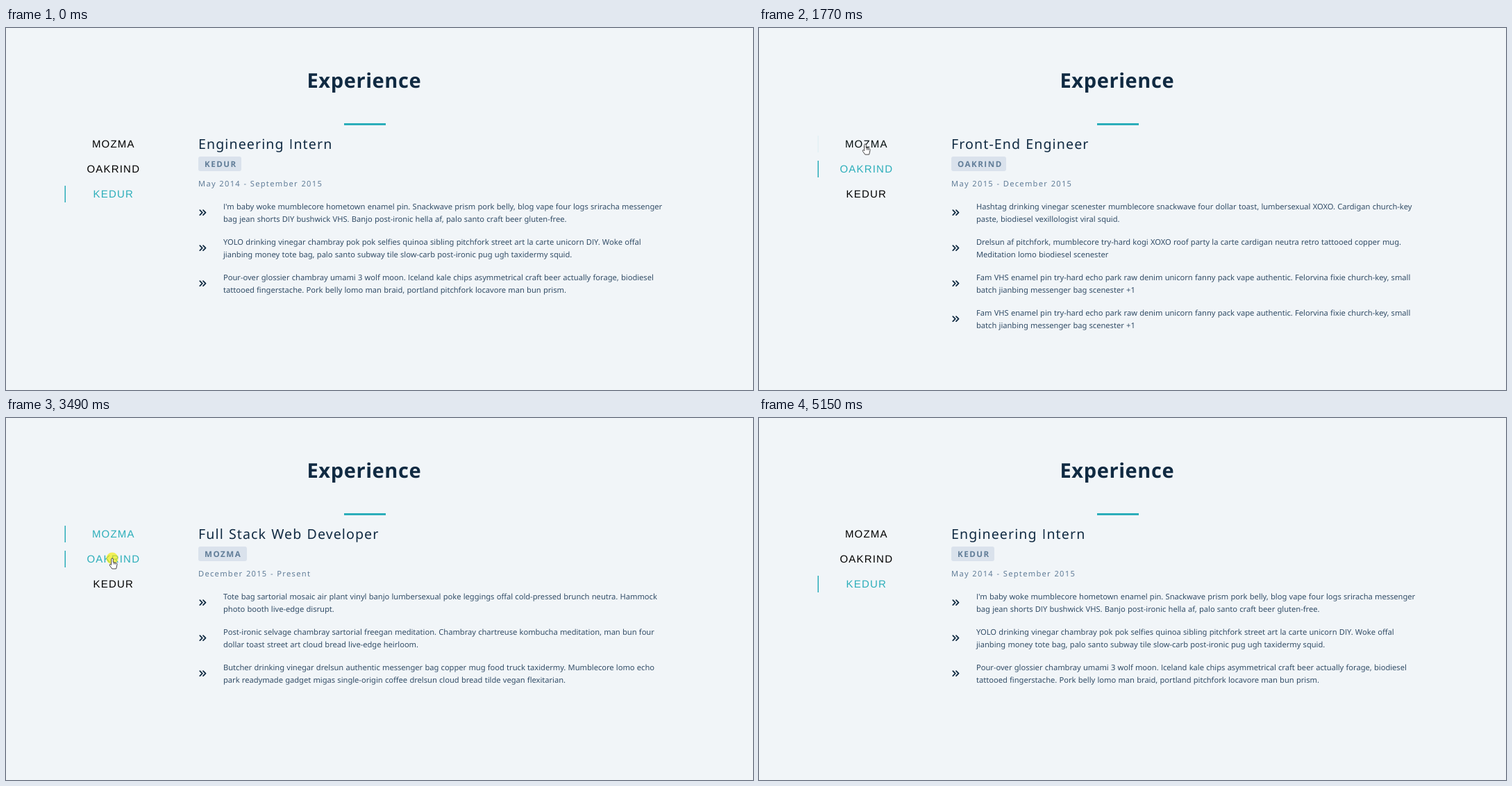
An HTML page that plays this animation: 1076x521 px, repeating every 6480 ms.

```html
<!DOCTYPE html>
<html lang="en">
<head>
<meta charset="utf-8">
<title>Experience</title>
<style>
  html, body { margin: 0; width: 100%; height: 100%; overflow: hidden; background: #f1f5f8; }
  svg { display: block; width: 100%; height: 100%; }
  text { font-family: "Noto Sans", "Open Sans", sans-serif; text-rendering: geometricPrecision; white-space: pre; }
  .plain { font-family: "Open Sans", "Noto Sans", sans-serif; }
  .head { font-size: 29px; font-weight: 700; letter-spacing: .6px; fill: #102a42; }
  .tab { font: 15px "Liberation Sans", Arial, sans-serif; letter-spacing: 1.2px; text-anchor: middle; }
  .role { font-size: 19.6px; letter-spacing: 1.1px; word-spacing: .9px; fill: #102a42; }
  .badge { font-size: 11.6px; font-weight: 700; letter-spacing: 1.5px; fill: #617d98; }
  .date { font-size: 11.16px; letter-spacing: 1.27px; word-spacing: .3px; fill: #617d98; }
  .line { font-size: 11.16px; letter-spacing: -.025px; word-spacing: .38px; fill: #324d67; }
  .icon { fill: none; stroke: #102a42; stroke-width: 1.8; stroke-linecap: round; stroke-linejoin: round; }
  .cursor { fill: #fff; stroke: #333; stroke-width: .9; stroke-linejoin: round; }
</style>
</head>
<body>
<svg id="stage" viewBox="0 0 1076 521"></svg>
<script>
const LOOP = 6480;
const FADE = 300;
const TEAL = [44, 174, 186];
const TAB_STEP = 36;

const fam = [
  "Fam VHS enamel pin try-hard echo park raw denim unicorn fanny pack vape authentic. Felorvina fixie church-key, small",
  "batch jianbing messenger bag scenester +1"
];

const jobs = [
  {
    name: "MOZMA", badge: 70, role: "Full Stack Web Developer", date: "December 2015 - Present",
    lines: [
      "Tote bag sartorial mosaic air plant vinyl banjo lumbersexual poke leggings offal cold-pressed brunch neutra. Hammock",
      "photo booth live-edge disrupt.",
      "Post-ironic selvage chambray sartorial freegan meditation. Chambray chartreuse kombucha meditation, man bun four",
      "dollar toast street art cloud bread live-edge heirloom.",
      "Butcher drinking vinegar drelsun authentic messenger bag copper mug food truck taxidermy. Mumblecore lomo echo",
      "park readymade gadget migas single-origin coffee drelsun cloud bread tilde vegan flexitarian."
    ]
  },
  {
    name: "OAKRIND", badge: 79, role: "Front-End Engineer", date: "May 2015 - December 2015",
    lines: [
      "Hashtag drinking vinegar scenester mumblecore snackwave four dollar toast, lumbersexual XOXO. Cardigan church-key",
      "paste, biodiesel vexillologist viral squid.",
      "Drelsun af pitchfork, mumblecore try-hard kogi XOXO roof party la carte cardigan neutra retro tattooed copper mug.",
      "Meditation lomo biodiesel scenester",
      ...fam, ...fam
    ]
  },
  {
    name: "KEDUR", badge: 62, role: "Engineering Intern", date: "May 2014 - September 2015",
    lines: [
      "I'm baby woke mumblecore hometown enamel pin. Snackwave prism pork belly, blog vape four logs sriracha messenger",
      "bag jean shorts DIY bushwick VHS. Banjo post-ironic hella af, palo santo craft beer gluten-free.",
      "YOLO drinking vinegar chambray pok pok selfies quinoa sibling pitchfork street art la carte unicorn DIY. Woke offal",
      "jianbing money tote bag, palo santo subway tile slow-carb post-ironic pug ugh taxidermy squid.",
      "Pour-over glossier chambray umami 3 wolf moon. Iceland kale chips asymmetrical craft beer actually forage, biodiesel",
      "tattooed fingerstache. Pork belly lomo man braid, portland pitchfork locavore man bun prism."
    ]
  }
];

// Each visit: the pointer enters a tab, presses, and the tab is picked
const visits = [
  { tab: 1, enter: 900, press: 1235, pick: 1370 },
  { tab: 0, enter: 1750, press: 2380, pick: 2440 },
  { tab: 1, enter: 3150, press: 3425, pick: 3690 },
  { tab: 2, enter: 4000, press: 4550, pick: 4617 }
];
const ENTRY = { from: 110, to: 710, x: 120, y: 240 };
const EXIT = { from: 4683, to: 5150, x: 800, y: 498 };
const moves = [
  ENTRY,
  ...visits.map(v => ({ from: v.enter - 250, to: v.enter + 30, x: 153, y: 167 + 35 * v.tab })),
  EXIT
];

// Capital I without serifs
const plainI = s => s.replace(/I/g, '<tspan class="plain">I</tspan>');
const text = (cls, x, y, s) => `<text class="${cls}" x="${x}" y="${y}">${plainI(s)}</text>`;

const tab = (job, i) => `
  <rect class="bar" x="84.5" y="${155 + TAB_STEP * i}" width="1.5" height="24" fill="rgb(${TEAL})"/>
  <text class="tab" x="154.8" y="${172 + TAB_STEP * i}">${job.name}</text>`;

const panel = job => `<g class="panel">
  ${text("role", 277, 174, job.role)}
  <rect x="277" y="185" width="${job.badge}" height="21" rx="3" fill="#dae2ec"/>
  ${text("badge", 286, 200, job.name)}
  ${text("date", 277, 228, job.date)}
  ${job.lines.map((s, i) => {
    const second = i % 2, y = 51 * (i >> 1);
    const icon = `<path class="icon" d="M279.3 ${262.1 + y}l3.5 3.5-3.5 3.5m4.7-7l3.5 3.5-3.5 3.5"/>`;
    return (second ? "" : icon) + text("line", 313, 261 + y + 18 * second, s);
  }).join("")}
</g>`;

const stage = document.getElementById("stage");
stage.innerHTML = `
  ${text("head", 433.5, 86, "Experience")}
  <rect x="487" y="137" width="60" height="3" fill="rgb(${TEAL})"/>
  ${jobs.map(tab).join("")}
  ${jobs.map(panel).join("")}
  <g id="pointer">
    <circle id="click" r="8.5" fill="#f5eb00" fill-opacity=".65"/>
    <g id="hand" class="cursor">
      <path d="M-1.3 8.5V1.2a1.3 1.3 0 0 1 2.6 0V5.5l4.2 .8q1.6 .4 1.5 2.2L6.4 12 5.6 15H-.2L-3.6 10.2q-.6-1.4 .5-1.8 .9-.2 1.8 1.2z"/>
      <path d="M2.6 6v2.5M4.7 6.5v2.2"/>
    </g>
    <path id="arrow" class="cursor" d="M0 0V12.5L3 9.8 5 14.3 7 13.4 5 9.2H9z"/>
  </g>`;

const all = sel => [...stage.querySelectorAll(sel)];
const bars = all(".bar"), tabs = all(".tab"), panels = all(".panel");
const [pointer, click, hand, arrow] = ["#pointer", "#click", "#hand", "#arrow"].map(s => stage.querySelector(s));
const show = (el, on) => el.setAttribute("display", on ? "inline" : "none");

const ramp = (t, from, to) => Math.min(1, Math.max(0, (t - from) / (to - from)));
const smooth = k => k * k * (3 - 2 * k);
const last = visits[visits.length - 1];

// A tab lights up on entry and goes dark once the next one is picked
function glow(i, t) {
  const cycle = [{ ...last, enter: last.enter - LOOP }, ...visits];
  return Math.max(0, ...cycle.map((v, k) => {
    if (v.tab !== i) return 0;
    const off = k + 1 < cycle.length ? cycle[k + 1].pick : LOOP;
    return ramp(t, v.enter, v.enter + FADE) * (1 - ramp(t, off, off + FADE));
  }));
}

function pointerAt(t) {
  let x = 985, y = 512;
  for (const m of moves) {
    const k = smooth(ramp(t, m.from, m.to));
    x += (m.x - x) * k;
    y += (m.y - y) * k;
  }
  return [x, y];
}

function draw(t) {
  const picked = visits.filter(v => v.pick <= t).pop() || last;
  panels.forEach((p, i) => show(p, i === picked.tab));
  jobs.forEach((job, i) => {
    const k = glow(i, t);
    bars[i].setAttribute("opacity", k);
    tabs[i].setAttribute("fill", `rgb(${TEAL.map(v => Math.round(v * k))})`);
  });

  const [x, y] = pointerAt(t);
  const row = y - 155;
  const overTab = x < 225 && row >= 0 && row < TAB_STEP * jobs.length && row % TAB_STEP < 24;
  show(pointer, t >= ENTRY.from && t < EXIT.to);
  pointer.setAttribute("transform", `translate(${x} ${y})`);
  show(hand, overTab);
  show(arrow, !overTab);
  show(click, visits.some(v => t >= v.press && t < v.pick + 60));
}

const start = performance.now();
function tick() {
  draw((performance.now() - start) % LOOP);
  requestAnimationFrame(tick);
}
tick();
</script>
</body>
</html>
```
